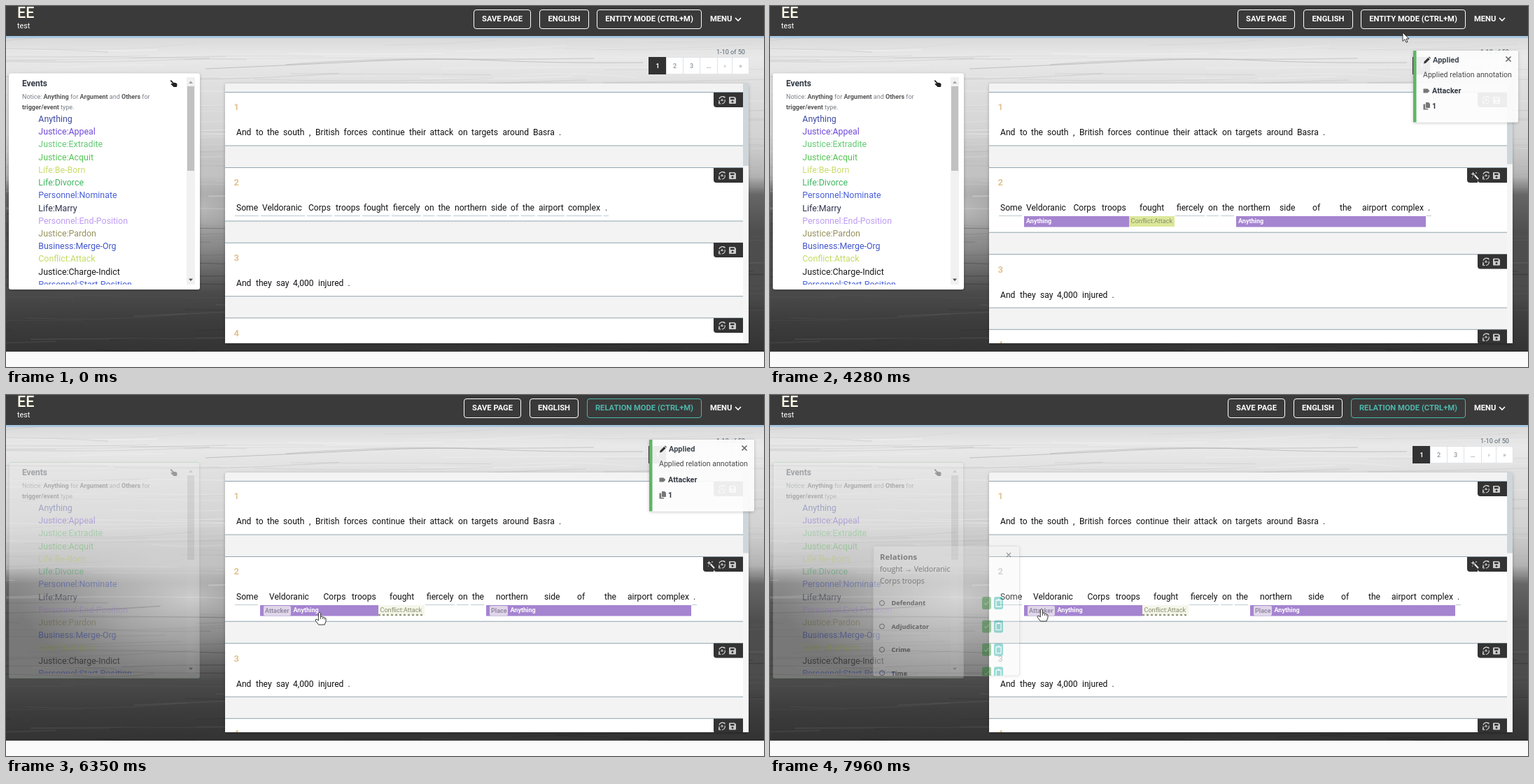
Recreate the animation shown at these times as an HTML page. Size 1083x517 px, loop 8000 ms.

```html
<!DOCTYPE html>
<html lang="en">
<head>
<meta charset="utf-8">
<title>Event annotation</title>
<style>
html, body { margin: 0; width: 100%; height: 100%; overflow: hidden; background: #fafafa; }
svg { display: block; width: 100vw; height: 100vh; }
text { font-family: Roboto, Arial, sans-serif; white-space: pre; }
.b { font-weight: 700; }
.pop text { font-family: "Open Sans", "Noto Sans", sans-serif; }
</style>
</head>
<body>
<svg id="stage" viewBox="0 0 1083 517" xmlns="http://www.w3.org/2000/svg"></svg>
<script>
const LOOP = 8000;
const stage = document.getElementById('stage');

// Markup helpers
const rect = (x, y, w, h, fill, more = '') =>
  `<rect x="${x}" y="${y}" width="${w}" height="${h}" fill="${fill}" ${more}/>`;
const text = (x, y, size, fill, s, more = '') =>
  `<text x="${x}" y="${y}" font-size="${size}" fill="${fill}" ${more}>${s}</text>`;
const bold = (x, y, size, fill, s, more = '') => text(x, y, size, fill, s, 'class="b" ' + more);
const line = (d, stroke, w = 1, more = '') =>
  `<path d="${d}" fill="none" stroke="${stroke}" stroke-width="${w}" ${more}/>`;
const shape = (d, fill, more = '') => `<path d="${d}" fill="${fill}" ${more}/>`;
const group = (id, body, more = '') => `<g id="${id}" ${more}>${body}</g>`;
const mid = 'text-anchor="middle"';

function random(seed) {
  return () => (seed = (seed * 16807) % 2147483647) / 2147483647;
}

function wood() {
  const rnd = random(4711);
  let out = rect(0, 46, 1083, 449, 'url(#wood)') +
    '<ellipse cx="265" cy="290" rx="250" ry="120" fill="url(#glow)"/>';
  for (let i = 0; i < 260; i++) {
    const y = 46 + rnd() * 449, x = rnd() * 1150 - 200, w = 90 + rnd() * 320;
    const dark = y > 300;
    const tone = dark ? (rnd() < .55 ? '#1c1c1c' : '#777') : (rnd() < .5 ? '#999' : '#fff');
    const bend = rnd() * 14 - 7, drop = rnd() * 14 - 9;
    out += line(`M${x.toFixed(1)} ${y.toFixed(1)}q${(w / 2).toFixed(1)} ${bend.toFixed(1)} ${w.toFixed(1)} ${drop.toFixed(1)}`,
      tone, (.5 + rnd() * 1.5).toFixed(1), `opacity="${(.08 + rnd() * .18).toFixed(2)}"`);
  }
  out += line('M285 90Q420 84 520 79T700 78T910 81', '#888', 1, 'opacity=".4"');
  out += line('M400 84Q520 75 620 76T840 75', '#aaa', 1.6, 'opacity=".4"');
  return out;
}

function outlined(x, w, label) {
  return rect(x + .5, 5.5, w, 27, 'none', 'stroke="#fff" rx="3.5"') +
    bold(x + w / 2 + .5, 22.3, 11.2, '#fff', label, mid);
}

function header() {
  return rect(0, 0, 1083, 43, '#3a3a3a') + rect(0, 43, 1083, 3, '#a9c8e2') +
    text(16, 17, 21.5, '#fffbe9', 'EE', 'font-weight="500"') +
    text(16, 32, 10.8, '#fff', 'test') +
    group('entityBar', outlined(668, 81, 'SAVE PAGE') + outlined(762, 70, 'ENGLISH') +
      rect(845, 6, 148, 26, '#7b7f82', 'id="entityFill"') + outlined(844, 149, 'ENTITY MODE (CTRL+M)')) +
    group('relationBar', outlined(654, 81, 'SAVE PAGE') + outlined(748, 69, 'ENGLISH') +
      rect(831, 6, 162, 26, '#7b7f82', 'id="relationFill"') +
      rect(830.5, 5.5, 163, 27, 'none', 'id="relationEdge" rx="3.5"') +
      bold(912, 22.3, 11.2, '#fff', 'RELATION MODE (CTRL+M)', 'id="relationText" ' + mid)) +
    bold(1006, 22.3, 11.2, '#fff', 'MENU') +
    line('M1042 17l4 4l4-4', '#fff', 1.6);
}

const kinds = [
  ['Anything', '#3d4ba3'], ['Justice:Appeal', '#6e48d8'], ['Justice:Extradite', '#62cb72'],
  ['Justice:Acquit', '#56c455'], ['Life:Be-Born', '#c9dc6a'], ['Life:Divorce', '#3fb660'],
  ['Personnel:Nominate', '#485fd6'], ['Life:Marry', '#2c3150'], ['Personnel:End-Position', '#bd9cf2'],
  ['Justice:Pardon', '#95905a'], ['Business:Merge-Org', '#4156cc'], ['Conflict:Attack', '#c3da62'],
  ['Justice:Charge-Indict', '#1b1b1b'], ['Personnel:Start-Position', '#485fd6']
];

function events() {
  const b = s => `<tspan class="b" fill="#555">${s}</tspan>`;
  return rect(4, 96.5, 273, 309.5, '#fff', 'id="eventsBack" rx="3" filter="url(#shadow)"') +
    rect(4.5, 96.5, 272, 309, 'none', 'id="eventsEdge" rx="3" stroke="#66bb6a"') +
    bold(23, 115.3, 12, '#333a44', 'Events') +
    text(23, 133, 9, '#777f88', `Notice: ${b('Anything')} for ${b('Argument')} and ${b('Others')} for`) +
    text(23, 148, 9, '#777f88', `${b('trigger/event')} type.`) +
    shape('M234.500 107q1-1.500 2.500 0l2 2.500l4 .8q1.800.6 1.600 2.500l-.6 3.200h-4.500l-4-4q0-1.400 2-.8l.4-.2z', '#222') +
    `<g clip-path="url(#listClip)">` +
    kinds.map(([s, c], i) => text(46.3, (166 + i * 18.22).toFixed(1), 12.4, c, s)).join('') + '</g>' +
    rect(258, 102, 12, 297, '#f1f1f1', 'class="track"') + rect(259, 115, 10, 121, '#c1c1c1') +
    shape('M261 111l3-3.500l3 3.500z', '#a3a3a3') + shape('M261 390.500l3 3.500l3-3.500z', '#505050');
}

function tools(y, id = '') {
  const ring = line(`M1019 ${y + 9}a4.500 4.500 0 0 1 7.500-2M1027 ${y + 10}a4.500 4.500 0 0 1-4 6M1020 ${y + 15}a4.500 4.500 0 0 1-1-4`, '#ddd', 1.1) +
    line(`M1021.500 ${y + 11.500}l1.500-2.500l1.500 2.500zM1025 ${y + 6}h2v2M1018.500 ${y + 13}v3h3`, '#ddd', .9);
  const disk = shape(`M1034 ${y + 6}h7l2 2v7q0 1-1 1h-8q-1 0-1-1v-8q0-1 1-1zM1035 ${y + 7.500}v2.500h5.500v-2.500zM1038 ${y + 11.500}a1.500 1.500 0 1 0 .01 0z`, '#ccc', 'fill-rule="evenodd"');
  const wand = id && group(id, shape(`M1011 ${y}h-15v17q0 4 4 4h11z`, '#333') +
    line(`M1006.500 ${y + 10}l5.500 6`, '#eee', 2) +
    line(`M1004.500 ${y + 6}v5M1002 ${y + 8.500}h5M1009 ${y + 6}v2M1003 ${y + 13}h1`, '#eee', 1));
  return shape(`M1011 ${y}h42v21h-38q-4 0-4-4z`, '#333') + wand + ring + disk;
}

// The sides lie outside the visible board, so only top and bottom rules show
function row(n, y, id = '') {
  return rect(305, y, 760, 76.5, '#fff', `id="box${n}" stroke="#90a4ae"`) +
    bold(325.5, y + 25.8, 13, '#e3c190', n, `id="num${n}"`) + tools(Math.round(y + .2), id);
}

const spread = (s, xs, y) =>
  s.split(' ').map((w, i) => text(xs[i], y, 12.1, '#111', w)).join('');

const phrase = 'Some Veldoranic Corps troops fought fiercely on the northern side of the airport complex .';
const baseXs = [329, 366, 432, 471, 511, 553, 598, 617.5, 641, 693, 721, 738, 761, 803, 856];
const layouts = [
  { xs: baseXs, tags: [] },
  { xs: baseXs.map((x, i) => x + (i > 4 ? 24.3 : i === 4 ? 13 : 0)), tags: [[509, 574, 4, 4]] },
  { xs: [329, 366, 433.5, 474, 528, 581, 626, 646, 669, 728, 775, 814, 846, 888, 940],
    tags: [[363, 513, 1, 3], [513, 578, 4, 4], [666, 937, 8, 13]] },
  { xs: [329, 376, 453.5, 494, 548, 601, 646, 666, 700, 769, 816, 855, 888, 930, 982],
    tags: [[363, 532, 1, 3, 'Attacker', 39], [532, 598, 4, 4], [686, 979, 8, 13, 'Place', 26]] }
];

function tagMark([x0, x1, first, , role, roleW]) {
  if (first === 4) {
    return rect(x0, 301, x1 - x0, 15, '#dce899', 'class="trigger"') +
      text(x0 + 2.5, 311.3, 9.1, '#868b6c', 'Conflict:Attack') +
      line(`M${x0} 315h${x1 - x0}`, '#979b82', 2.5, 'stroke-dasharray="3 3" class="dots"');
  }
  const chip = role ? rect(x0 + 5, 302, roleW, 14, '#dfd7e8', 'rx="2"') +
    bold(x0 + 7, 312, 9, '#968aa8', role) : '';
  return rect(x0, 301, x1 - x0, 15.5, '#a584d0') + chip +
    bold(x0 + (role ? roleW + 8.5 : 3), 311.3, 9, '#fff', 'Anything');
}

function sentence({ xs, tags }, k) {
  const under = xs.map((x, i) => {
    if (tags.some(t => i >= t[2] && i <= t[3])) return '';
    const next = tags.find(t => t[2] === i + 1);
    const end = Math.min((xs[i + 1] || x + 10) - 5, next ? next[0] - 3 : 9999);
    return `M${x - 2} 300.500H${end}`;
  }).join('');
  return group('words' + k, spread(phrase, xs, 293) + line(under, '#bccbd0') + tags.map(tagMark).join(''));
}

function pages() {
  const edges = [918.5, 943.5, 967.5, 991.5, 1016.5, 1037.5, 1061.5];
  const cells = ['1', '2', '3', '…', '›', '»'].map((s, i) => {
    const x = edges[i], w = edges[i + 1] - x;
    return rect(x, 73.5, w, 24, i ? '#fff' : '#333', `stroke="${i ? '#dee2e6' : '#333'}"`) +
      bold(x + w / 2, 88.5, 9, i ? '#a0a4a8' : '#fff', s, mid);
  }).join('');
  return text(1015, 69, 9.1, '#546570', '1-10 of 50') + cells;
}

function board() {
  const first = 'And to the south , British forces continue their attack on targets around Basra .';
  const firstXs = [329, 357, 373, 396, 433, 442, 482.5, 523, 576, 605.5, 646, 665, 709.5, 753, 790];
  return rect(313, 111, 748, 372, '#f3f3f3', 'rx="3" filter="url(#shadow)"') +
    '<g clip-path="url(#boardClip)">' + row(1, 123.5) + spread(first, firstXs, 185.3) +
    row(2, 231.5, 'wand') + layouts.map(sentence).join('') +
    group('lower', row(3, 339.2) + spread('And they say 4,000 injured .', [329, 357, 386, 410, 446, 488.5], 401) +
      row(4, 446.8)) +
    rect(1053, 111, 8, 372, '#f5f5f5') + rect(1053, 111, 8, 118, '#cfd6da', 'id="thumb"') + '</g>';
}

function toast() {
  return rect(919, 64, 150, 102.5, '#fff', 'rx="2" fill-opacity=".9" filter="url(#shadow)"') +
    rect(919, 64, 4.5, 102.5, '#5fb565') +
    shape('M934 82.500l.7-3l5.600-5.600l2.300 2.300l-5.600 5.600zM941 73.200l.8-.7l2.200 2.200l-.7.8z', '#333') +
    bold(947, 81.3, 11, '#3f4750', 'Applied') +
    line('M1051.500 72.500l7 7M1058.500 72.500l-7 7', '#666', 1.7) +
    text(933, 102.3, 10.6, '#4a4a4a', '', 'id="toastLine"') +
    shape('M933.500 118.500h6l3 3l-3 3h-6z', '#777') +
    bold(946, 124.6, 10.8, '#333a44', '', 'id="toastKind"') +
    shape('M937 138h4l2 2v6h-6z', '#777') + shape('M933.500 140.500h2.700v6.500h4v1.500h-6.700z', '#777') +
    bold(946, 146.8, 10.8, '#333a44', '1');
}

function relations() {
  const rows = ['Defendant', 'Adjudicator', 'Crime', 'Time'].map((s, i) => {
    const y = 298 + i * 33.4;
    return `<circle cx="160" cy="${y}" r="3.500" fill="none" stroke="#333"/>` + bold(173.5, y + 3.3, 9.2, '#222', s) +
      rect(303, y - 9, 13, 18, '#4a9a50', 'rx="3"') + line(`M306.500 ${y}l2 2.500l4-5`, '#cfe3d0', 1) +
      rect(320, y - 9, 13, 18, '#35b5ac', 'rx="3"') + line(`M323 ${y - 4}h7v9h-7zM325 ${y - 5}h3`, '#e6f5f4', 1.3);
  }).join('');
  return rect(148, 216.5, 208.5, 185.5, '#fff', 'rx="2" fill-opacity=".45" stroke="#ccc" filter="url(#shadow)"') +
    bold(157, 236, 11.4, '#333', 'Relations') + line('M338 226l6 6M344 226l-6 6', '#444', 1.2) +
    text(157, 253, 10.6, '#333', 'fought → Veldoranic') + text(157, 269.5, 10.6, '#333', 'Corps troops') +
    '<g clip-path="url(#popClip)">' + rows + '</g>';
}

const stops = [[0, '#dadada'], [.06, '#e9e9e9'], [.14, '#e0e0e0'], [.32, '#d2d2d2'], [.44, '#b4b4b4'],
  [.5, '#666'], [.62, '#4e4e4e'], [.8, '#4c4c4c'], [.9, '#3d3d3d'], [1, '#333']];
const clip = (id, x, y, w, h) => `<clipPath id="${id}">${rect(x, y, w, h, '#000')}</clipPath>`;

stage.innerHTML = `<defs>
  <linearGradient id="wood" x2="0" y2="1">${stops.map(([o, c]) => `<stop offset="${o}" stop-color="${c}"/>`).join('')}</linearGradient>
  <radialGradient id="glow"><stop stop-color="#ddd" stop-opacity=".75"/>
    <stop offset=".5" stop-color="#ccc" stop-opacity=".45"/><stop offset="1" stop-color="#bbb" stop-opacity="0"/></radialGradient>
  <filter id="shadow" x="-10%" y="-10%" width="120%" height="120%">
    <feDropShadow dx="0" dy="1" stdDeviation="2" flood-opacity=".25"/></filter>
  ${clip('listClip', 23, 153, 234, 246)}${clip('boardClip', 313, 111, 748, 372)}${clip('popClip', 148, 216, 209, 186)}
  ${clip('woodClip', 0, 46, 1083, 449)}</defs>` +
  rect(0, 0, 1083, 517, '#fafafa') + `<g clip-path="url(#woodClip)">${wood()}</g>` + header() +
  group('events', events()) + group('pages', pages()) + board() +
  group('pop', relations(), 'class="pop"') + group('toast', toast()) +
  group('cursor',
    group('arrow', shape('M0 0v12.500l3-2.700l2 4.500l2-.9l-2-4.300h4z', '#fff', 'stroke="#222" stroke-width=".9"')) +
    group('hand', shape('M-1.700 1.500Q0-1 1.500 1.500V6.500q2.700-1 3 .7q2.300-.6 2.600 1q1.900-.2 1.900 1.500V13L7 18H-1.500L-6 12Q-6.300 9.700-4 10.200L-1.700 12Z',
      '#fff', 'stroke="#222" stroke-width=".9"') + line('M1.500 6.500V10M4.500 7.500V10M7 8.500V10.500', '#222', .8)));

const el = {};
stage.querySelectorAll('[id]').forEach(n => el[n.id] = n);
const triggers = stage.querySelectorAll('.trigger');
const dots = stage.querySelectorAll('.dots');
const track = stage.querySelector('.track');

const set = (node, name, value) => node.setAttribute(name, value);
const show = (node, on) => { node.style.display = on ? '' : 'none'; };
const clamp = v => Math.max(0, Math.min(1, v));
const ramp = (t, a, b) => clamp((t - a) / (b - a));

// Pointer path: time, x, y
const path = [[70, 1046, 250], [870, 762, 442], [1070, 1023, 247], [3790, 1023, 247], [4280, 904, 38],
  [4450, 900, 22], [4690, 892, 20], [4840, 558, 254], [5390, 548, 299], [5740, 546, 300], [6050, 392, 308],
  [6350, 448, 311], [6550, 478, 314], [6740, 481, 315], [7080, 481, 315], [7820, 390, 306], [7960, 388, 306]];

function pointer(t) {
  const i = path.findIndex(p => p[0] > t);
  if (i < 1) return path[i < 0 ? path.length - 1 : 0].slice(1);
  const [a, ax, ay] = path[i - 1], [b, bx, by] = path[i];
  const k = (t - a) / (b - a);
  return [ax + (bx - ax) * k, ay + (by - ay) * k];
}

function draw(t) {
  const marked = t >= 2530, relation = t >= 4630;
  const stepNow = t < 2530 ? 0 : t < 2930 ? 1 : t < 5740 ? 2 : 3;
  layouts.forEach((_, k) => show(el['words' + k], k === stepNow));
  set(el.box2, 'height', marked ? 92.7 : 76.5);
  set(el.lower, 'transform', `translate(0 ${marked ? 16.5 : 0})`);
  set(el.thumb, 'height', marked ? 115.5 : 118);
  show(el.wand, t >= 2730);
  const numberTone = t >= 6410 ? '#c9c9c4' : '#e3c190';
  set(el.num2, 'fill', numberTone);
  set(el.num3, 'fill', numberTone);

  show(el.toast, marked && t < 6740);
  set(el.toast, 'opacity', 1 - ramp(t, 6540, 6740));
  el.toastLine.textContent = `Applied ${t < 2730 ? 'entity' : 'relation'} annotation`;
  el.toastKind.textContent = t < 2730 ? 'Conflict:Attack' : t < 2930 ? 'Place' : 'Attacker';

  show(el.entityBar, !relation);
  show(el.relationBar, relation);
  set(el.entityFill, 'width', 148 * ramp(t, 4380, 4560));
  set(el.relationFill, 'width', 162 * (1 - ramp(t, 4760, 5090)));
  const modeTone = t < 4950 ? '#fff' : '#4db6ac';
  set(el.relationEdge, 'stroke', modeTone);
  set(el.relationText, 'fill', modeTone);

  const dim = ramp(t, 4630, 4830);
  set(el.events, 'opacity', 1 - .64 * dim);
  set(el.eventsBack, 'fill-opacity', 1 - .35 * dim);
  set(el.eventsEdge, 'stroke-opacity', .6 * dim);
  set(track, 'opacity', 1 - .8 * dim);

  const pale = (t >= 5900 && t < 6940) || t >= 7500;
  const tagTone = pale ? '#f5f6ea' : t < 5740 ? '#dce899' : '#e7eebf';
  triggers.forEach(n => set(n, 'fill', tagTone));
  dots.forEach(n => show(n, relation));

  const pop = t < 7000 ? .5 * ramp(t, 5960, 6080) * (1 - ramp(t, 6160, 6300)) : .5 * ramp(t, 7760, 7960);
  show(el.pop, pop > 0);
  set(el.pop, 'opacity', pop);

  const hand = (t >= 1070 && t < 3830) || (t >= 4440 && t < 4720) || t >= 5590;
  show(el.cursor, t >= 70);
  show(el.hand, hand);
  show(el.arrow, !hand);
  set(el.cursor, 'transform', `translate(${pointer(t).map(v => v.toFixed(1)).join(' ')})`);
}

const start = performance.now();
function frame() {
  draw((performance.now() - start) % LOOP);
  requestAnimationFrame(frame);
}
frame();
</script>
</body>
</html>
```
